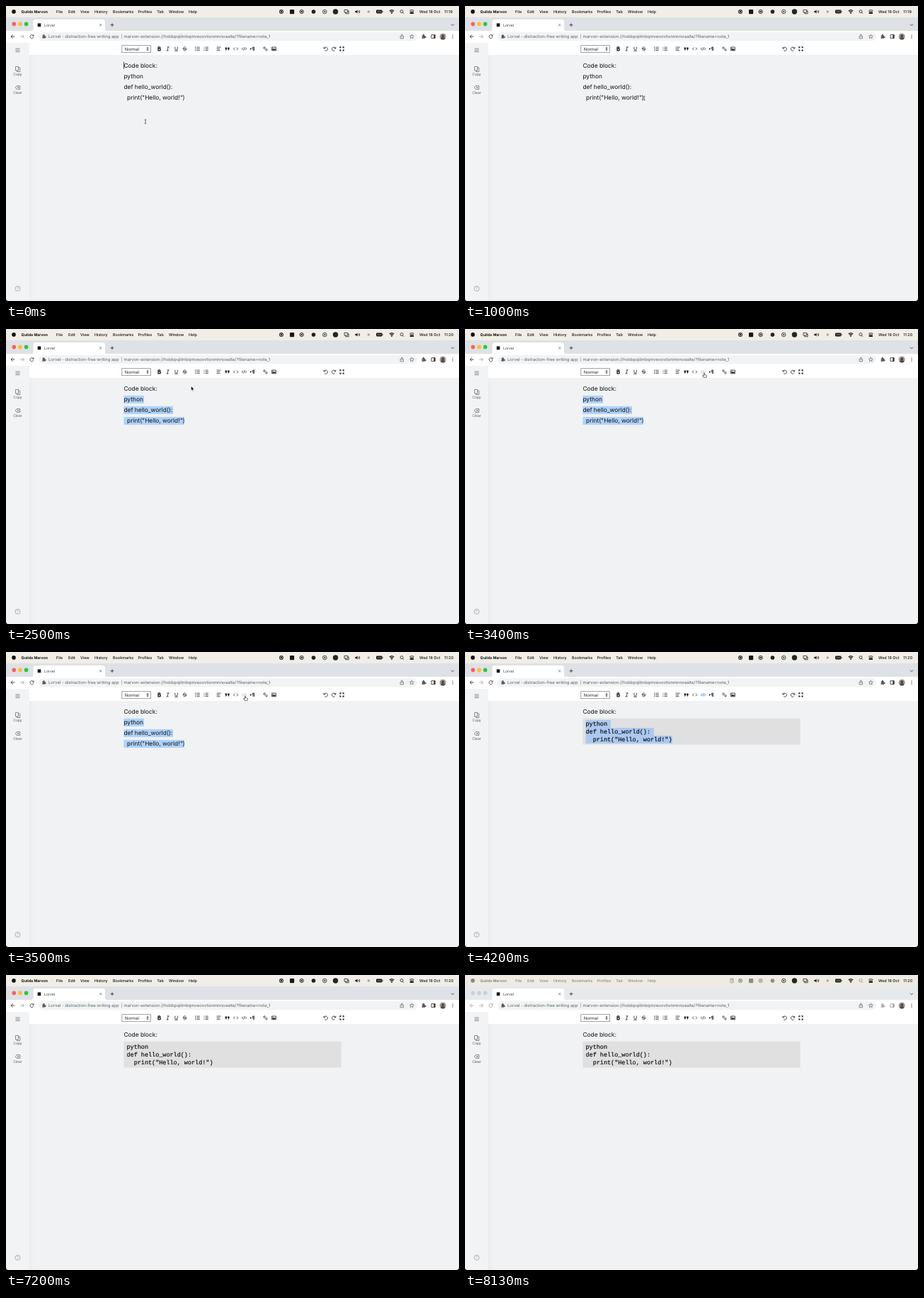
These frames come from a looping animation (640 px wide and 416 px high, 8270 ms). An HTML page:

```html
<!DOCTYPE html>
<html lang="en">
<head>
<meta charset="utf-8">
<title>Code block demo</title>
<style>
  html, body { margin: 0; width: 100%; height: 100%; overflow: hidden; background: #000; }
  svg { display: block; width: 640px; height: 416px; border-radius: 0 0 4px 4px; }
  text { font-family: Inter, "Open Sans", sans-serif; text-rendering: geometricPrecision; fill: #111; }
  .menu { font-size: 5.45px; font-weight: 500; }
  .app { font-size: 5.25px; font-weight: 700; }
  .tab { font-size: 5.1px; fill: #333; }
  .url { font-size: 5.92px; fill: #5c6064; }
  .pick { font-size: 5.92px; fill: #222; }
  .side { font-size: 4.95px; fill: #555; text-anchor: middle; }
  .body { font-size: 8.4px; }
  .mono text { font: 8.47px "Liberation Mono", "Courier New", monospace; stroke: #111; stroke-width: .2; }
  .line { fill: none; stroke: #222; stroke-width: .8; }
  .thick { fill: none; stroke: #111; stroke-width: 1.2; }
  .thin { fill: none; stroke: #5a5d61; stroke-width: .7; }
  .pale { fill: none; stroke: #e8e4de; stroke-width: .6; }
  .solid { fill: #181818; }
  .soft { fill: #55585c; }
  #strip { fill: #dee1e6; }
  #bar { fill: #f0eee6; }
  .idle #strip { fill: #e7eaed; }
  .idle #bar { fill: #eeebe4; }
  .idle .dim { opacity: .45; }
  .idle .lights circle { fill: #cdcfd3; }
  #extra { display: none; }
  .idle #extra { display: inline; opacity: .45; }
  #codeIcon.on path { stroke: #0b66c8; }
  #codeIcon.hover { opacity: .35; }
</style>
</head>
<body>
<svg id="stage" viewBox="0 0 640 416"></svg>
<script>
const LOOP = 8270, IDLE = 8130, STEP = 100;
const stage = document.getElementById('stage');

const icon = (x, y, d, cls = 'line', turn = '') =>
  `<path class="${cls}" transform="translate(${x} ${y}) ${turn}" d="${d}"/>`;
const text = (x, y, s, cls, id = '') => `<text x="${x}" y="${y}" class="${cls}" id="${id}">${s}</text>`;
const rect = (x, y, w, h, fill, more = '') =>
  `<rect x="${x}" y="${y}" width="${w}" height="${h}" fill="${fill}" ${more}/>`;
const dot = (x, y, r, fill, more = '') => `<circle cx="${x}" cy="${y}" r="${r}" fill="${fill}" ${more}/>`;
const ring = (x, y, r, w = .8) => dot(x, y, r, 'none', `stroke="#222" stroke-width="${w}"`);

const PUZZLE = 'M-2.6-1.4H-1a1.1 1.1 0 1 1 1.8 0H2V.2a1.1 1.1 0 1 1 0 1.8V3H-2.6V1.6a.9.9 0 1 0 0-1.8z';
const UNDO = 'M-1.5 2.3A2.6 2.6 0 1 0-2.4-.6M-2.9-2.6L-2.5-.3-.3-.6';
const ROWS = 'M-1-2.2H3.2M-1 0H3.2M-1 2.2H3.2';

function menuBar() {
  const items = [['File', 71], ['Edit', 88], ['View', 105], ['History', 125], ['Bookmarks', 151],
    ['Profiles', 186.5], ['Tab', 213.2], ['Window', 230], ['Help', 258]];
  return `<rect id="bar" width="640" height="17"/>
  <g class="dim">${dot(11, 7.9, 2.8, '#111')}${text(21.6, 9.9, 'Quilda Marvon', 'app')}
    ${items.map(([s, x]) => text(x, 9.9, s, 'menu')).join('')}
    ${ring(389, 8, 2.4, 1.1)}${rect(388, 7, 2, 2, '#222')}
    ${rect(401, 5, 6.2, 6.2, '#181818', 'rx="1"')}
    ${ring(417.7, 8, 2.6, 1)}${dot(417.7, 8, 1.2, '#222')}
    ${dot(434.5, 8, 2.8, '#222')}
    ${ring(559, 7.6, 2)}${icon(559, 8, 'M1.4 1.1L3 2.8')}
  </g>
  <g id="extra">${icon(377, 8, 'M-2-2.8H2V2.8H-2zM0-2.8V0H2')}</g>
  ${ring(450.3, 8, 2.8)}${icon(450.3, 8, 'M-.8-1.4L1.5 0-.8 1.4z', 'solid')}
  ${dot(465.5, 8, 3.7, '#1c2a22')}
  ${icon(481, 8, 'M-3-2.6H1.8V1H-3zM-1.2 1V2.8H3.2V-1H1.8')}
  ${icon(496.5, 8, 'M-3.2-1H-1.8L0-2.6V2.6L-1.8 1H-3.2z', 'solid')}
  ${icon(497, 8, 'M.8-1.2Q1.7 0 .8 1.2M2-2.1Q3.7 0 2 2.1')}
  ${dot(512.3, 8, 1.8, '#a8a5a0')}
  ${rect(523, 5.6, 8.6, 4.8, '#1b1b1b', 'rx="1.4"')}${rect(532.1, 7.2, .8, 1.6, '#555')}
  ${icon(527.3, 8, 'M-2-1V1M0-1V1M2-1V1', 'pale')}
  ${icon(545, 8.2, 'M-3.2-1.2Q0-4 3.2-1.2M-1.9.3Q0-1.4 1.9.3', 'thick')}${dot(545, 10, .9, '#111')}
  ${icon(573.3, 8, 'M-1.6-2.3H1.6a1 1 0 0 1 0 2H-1.6a1 1 0 0 1 0-2z')}
  ${rect(570.5, 8.6, 5.6, 2.5, '#222', 'rx="1.2"')}
  ${text(584, 9.9, 'Wed 18 Oct', 'menu')}${text(619.2, 9.9, '11:19', 'menu', 'clock')}`;
}

function browser() {
  return `<rect id="strip" y="16" width="640" height="20"/>
  <g class="lights">${dot(11.3, 25.4, 2.8, '#fe5f57')}${dot(20, 25.4, 2.8, '#febc2e')}${dot(28.6, 25.4, 2.8, '#28c840')}</g>
  <path fill="#fff" d="M35 35.5Q38.5 35.5 38.5 32V22.5Q38.5 19 42 19H136.5Q140 19 140 22.5V32Q140 35.5 143.5 35.5z"/>
  ${rect(0, 35, 640, 17, '#fff')}
  ${rect(44.7, 24.4, 4.6, 4.8, '#181818')}${text(54, 28.6, 'Lorvel', 'tab')}
  ${icon(133.6, 26.7, 'M-1.6-1.6L1.6 1.6M1.6-1.6L-1.6 1.6', 'thin')}
  ${icon(150, 26.7, 'M-2.4 0H2.4M0-2.4V2.4')}
  ${icon(631, 26.7, 'M-2-1L0 1 2-1')}
  <g class="dim">${icon(9.5, 43, 'M2.8 0H-2.4M0-2.5L-2.5 0 0 2.5')}
    ${icon(36.5, 43, 'M2.1-1.3A2.5 2.5 0 1 0 2.5.5M2.6-2.7V-.9H.8')}</g>
  <g opacity=".45">${icon(23, 43, 'M-2.8 0H2.4M0-2.5L2.5 0 0 2.5')}</g>
  ${rect(46, 37, 535, 12.2, '#f1f3f4', 'rx="6.1"')}
  ${icon(53.5, 42.8, PUZZLE, 'soft', 'scale(.9)')}
  ${text(60, 44.9, 'Lorvel - distraction-free writing app', 'url')}
  ${rect(163.3, 39.8, .6, 6.4, '#8b8e92')}
  ${text(166.5, 44.9, 'marvon-extension://hobbpqiilmbqmveoovtionmnnoealte/?filename=note_1', 'url')}
  ${icon(559.3, 43, 'M-1-.8H-2.2V2.8H2.2V-.8H1M0 1V-3M-1.3-1.8L0-3 1.3-1.8', 'thin')}
  ${icon(573.3, 43, 'M0-2.9L.9-1 2.9-.8 1.4.6 1.8 2.6 0 1.6-1.8 2.6-1.4.6-2.9-.8-.9-1z', 'thin')}
  <g class="dim">${icon(590, 42.8, PUZZLE, 'soft')}
    ${icon(603.6, 43, 'M-2.6-2.4H2.6V2.4H-2.6z')}${rect(604.3, 40.6, 2, 4.8, '#333')}</g>
  ${dot(617.2, 43, 4.5, '#a39a96')}
  <path fill="#574a46" d="M614 46.2Q614.2 44.2 616.2 43.9A2 2 0 1 1 618.2 43.9Q620.2 44.2 620.4 46.2A4.5 4.5 0 0 1 614 46.2z"/>
  ${[-2.2, 0, 2.2].map(d => dot(631, 43 + d, .65, '#444')).join('')}`;
}

function page() {
  return `<linearGradient id="edge"><stop stop-color="#eaecee"/><stop offset="1" stop-color="#f0f2f4"/></linearGradient>
  ${rect(0, 52, 640, 364, '#f0f2f4')}${rect(0, 52, 33, 364, '#f2f3f4')}
  ${rect(33, 52, 6, 364, 'url(#edge)')}${rect(33, 52, 607, 17, '#fff')}
  ${icon(16.5, 62.3, 'M-3.1-2.2H3.1M-3.1 0H3.1M-3.1 2.2H3.1', 'thin')}
  ${icon(16.5, 89, 'M-3-3.6H1V2H-3zM1-2H3.2V3.6H-1V2', 'thin')}${text(16.5, 98.4, 'Copy', 'side')}
  ${icon(16.7, 115, 'M-3.4 0L-1.5-2.4H3V2.4H-1.5zM-.6-1.1L1.6 1.1M1.6-1.1L-.6 1.1', 'thin')}${text(16.5, 124.1, 'Clear', 'side')}
  <g opacity=".65"><circle class="thin" cx="16.5" cy="398.5" r="3.5"/>${text(16.5, 400.2, '?', 'side')}</g>`;
}

function tools() {
  const list = [
    [216.6, 'M-1.6-2.5V2.5H.5a1.35 1.35 0 0 0 0-2.7H-1.6M-1.6-2.5H.2a1.15 1.15 0 0 1 0 2.3', 'thick'],
    [228.6, 'M-1-2.5H2M-2 2.5H1M.7-2.5L-.7 2.5'],
    [240.6, 'M-1.8-2.8V-.2a1.8 1.8 0 0 0 3.6 0V-2.8M-2.4 2.8H2.4'],
    [252.6, 'M2-1.5C1.4-2.9-2-2.8-2-1.2S2 .2 2 1.3-1.6 2.9-2.2 1.5M-2.9 0H2.9'],
    [270.5, ROWS + 'M-2.7-3V-1.4M-2.7-.8V.8M-2.7 1.4V3'],
    [282.6, ROWS + 'M-3.2-2.2h1M-3.2 0h1M-3.2 2.2h1'],
    [300.6, 'M-3-2.3H3M-3 0H1.4M-3 2.3H2'],
    [312.6, 'M-3-2h2.5v2.2L-1.5 2.2H-2.6L-2 .3H-3zM.5-2H3v2.2L2 2.2H.9L1.5.3H.5z', 'solid'],
    [324.6, 'M-1.4-1.8L-3.1 0-1.4 1.8M1.4-1.8L3.1 0 1.4 1.8'],
    [348, 'M-3-1.5L-1 0-3 1.5z', 'solid'],
    [348, 'M1.2 2.6V-2.3M2.5 2.6V-2.3M3.1-2.3H1.1a1.2 1.2 0 0 0 0 2.4'],
    [366.5, 'M-.5-1.2H-2a1.2 1.2 0 0 0 0 2.4H-.5M.5-1.2H2a1.2 1.2 0 0 1 0 2.4H.5M-1.3 0H1.3', 'line', 'rotate(45)'],
    [378.5, 'M-2.9-2.4H2.9V2.4H-2.9z'],
    [378.5, 'M-2.2 1.8V.7L-.9-.3.2.6 1.2-.4 2.2.6V1.8zM-1.9-1.5h1v1h-1z', 'solid'],
    [451.7, UNDO],
    [463.1, UNDO, 'line', 'scale(-1 1)'],
    [474.5, 'M-2.5-.9V-2.5H-.9M.9-2.5H2.5V-.9M2.5.9V2.5H.9M-.9 2.5H-2.5V.9', 'thick']
  ];
  return `${rect(163.8, 55.7, 40.6, 10, '#fff', 'stroke="#777" stroke-width=".7"')}
  ${text(167.8, 62.8, 'Normal', 'pick')}
  ${icon(200, 60.6, 'M-1.6-.6L0-2.4 1.6-.6zM-1.6.6L0 2.4 1.6.6z', 'solid')}
  ${list.map(([x, d, cls, turn]) => icon(x, 60.4, d, cls, turn)).join('')}
  <g id="codeIcon">${icon(336.5, 60.4, 'M-1.7-1.7L-3.2 0-1.7 1.7M1.7-1.7L3.2 0 1.7 1.7M.7-2.1L-.7 2.1')}</g>`;
}

// right edge of each selected row, top to bottom
const PLAIN = [195, 236, 252], MONO = [206, 267, 293];
const words = ['python', 'def hello_world():', 'print("Hello, world!")'];

function editor() {
  const box = (x, y, w, h, fill) => rect(x, y, w, h, fill, 'class="sel"');
  return `<g id="plain">${PLAIN.map((r, i) => box(166.4, 93.8 + 15.1 * i, r - 166.4, 11, '#afd2fa')).join('')}
    ${words.map((s, i) => text(i == 2 ? 171.1 : 166.4, 102.1 + 15.1 * i, s, 'body')).join('')}</g>
  <g id="mono" class="mono">${rect(166.4, 93.6, 307.2, 37, '#e0e0e0')}
    ${MONO.map((r, i) => box(170.6, 96 + 11 * i, r - 170.6, 11, '#abc9f1')).join('')}
    ${words.map((s, i) => text(i == 2 ? 180.7 : 170.5, 104 + 11 * i, s, '')).join('')}</g>
  ${text(166.4, 86.9, 'Code block:', 'body')}
  <rect id="caret" x="166.2" y="78.8" width=".7" height="10" fill="#111"/>`;
}

const cursors = `
  <path id="beam" fill="none" stroke="#333" stroke-width=".7" d="M-1.3-2.9Q0-2.9 0-2.1Q0-2.9 1.3-2.9M0-2.3V2.3M-1.3 2.9Q0 2.9 0 2.1Q0 2.9 1.3 2.9"/>
  <path id="arrow" fill="#000" stroke="#fff" stroke-width=".5" d="M0 0V6L1.4 4.7 2.3 6.8 3.3 6.4 2.4 4.4H4.4z"/>
  <path id="hand" fill="#fff" stroke="#111" stroke-width=".6" d="M-.6.6a.6.6 0 0 1 1.2 0V2.6l2.2.5q.8.2.7 1L3.1 6.3H-.9L-2.6 4q.4-.9 1.2-.3l.8.6z"/>`;

stage.innerHTML = menuBar() + browser() + page() + tools() + editor() + cursors;
const $ = id => document.getElementById(id);
const show = (el, on) => { el.style.display = on ? 'inline' : 'none'; };
const plainSel = [...document.querySelectorAll('#plain .sel')];
const monoSel = [...document.querySelectorAll('#mono .sel')];

// pointer path: time, x, y
const path = [
  [0, 197, 163], [900, 253.2, 130], [1000, 253.2, 130], [1500, 158.8, 102.8], [2000, 158.8, 102.8],
  [2900, 335, 65], [3300, 338, 62], [3800, 338, 62], [4100, 461, 31],
  [6200, 517.6, 76.2], [6700, 516.6, 114.5], [7200, 516.6, 114.5]
];
const ease = p => p * p * (3 - 2 * p);

function pointer(t) {
  const i = path.findIndex((k, n) => n && t <= k[0]);
  if (i < 0) return path[path.length - 1].slice(1);
  const [t0, x0, y0] = path[i - 1], [t1, x1, y1] = path[i];
  const p = ease((t - t0) / (t1 - t0));
  return [x0 + (x1 - x0) * p, y0 + (y1 - y0) * p];
}

// selects from the pointer to the end of the last row
function drag(x, y) {
  const row = Math.max(0, Math.min(2, Math.floor((y - 91.8) / 15.1)));
  plainSel.forEach((el, i) => {
    const from = i == row ? Math.max(166.4, Math.min(PLAIN[i], x)) : 166.4;
    el.setAttribute('x', from);
    el.setAttribute('width', i < row ? 0 : PLAIN[i] - from);
  });
}

function draw(time) {
  const t = Math.floor(time / STEP) * STEP;
  const [x, y] = pointer(t);
  const visible = t < 4200 || (t >= 6200 && t < 7200);
  const block = t >= 3600, chosen = block && t < 6800;
  const kind = y > 90 && x > 166 ? 'beam' : y > 54 && y < 68 && x > 208 && x < 384 ? 'hand' : 'arrow';

  for (const id of ['beam', 'arrow', 'hand']) {
    show($(id), visible && id == kind);
    $(id).setAttribute('transform', `translate(${x} ${y})`);
  }
  show($('caret'), t < 1000);
  show($('plain'), !block);
  show($('mono'), block);
  for (const el of plainSel) show(el, t > 1000);
  for (const el of monoSel) show(el, chosen);
  if (t <= 1500) drag(x, y); else drag(0, 0);

  $('codeIcon').setAttribute('class', chosen ? 'on' : kind == 'hand' && Math.abs(x - 336.5) < 6 ? 'hover' : '');
  $('clock').textContent = t < 2500 ? '11:19' : '11:20';
  stage.setAttribute('class', time >= IDLE ? 'idle' : '');
}

const start = performance.now();
function tick() {
  draw((performance.now() - start) % LOOP);
  requestAnimationFrame(tick);
}
tick();
</script>
</body>
</html>
```
